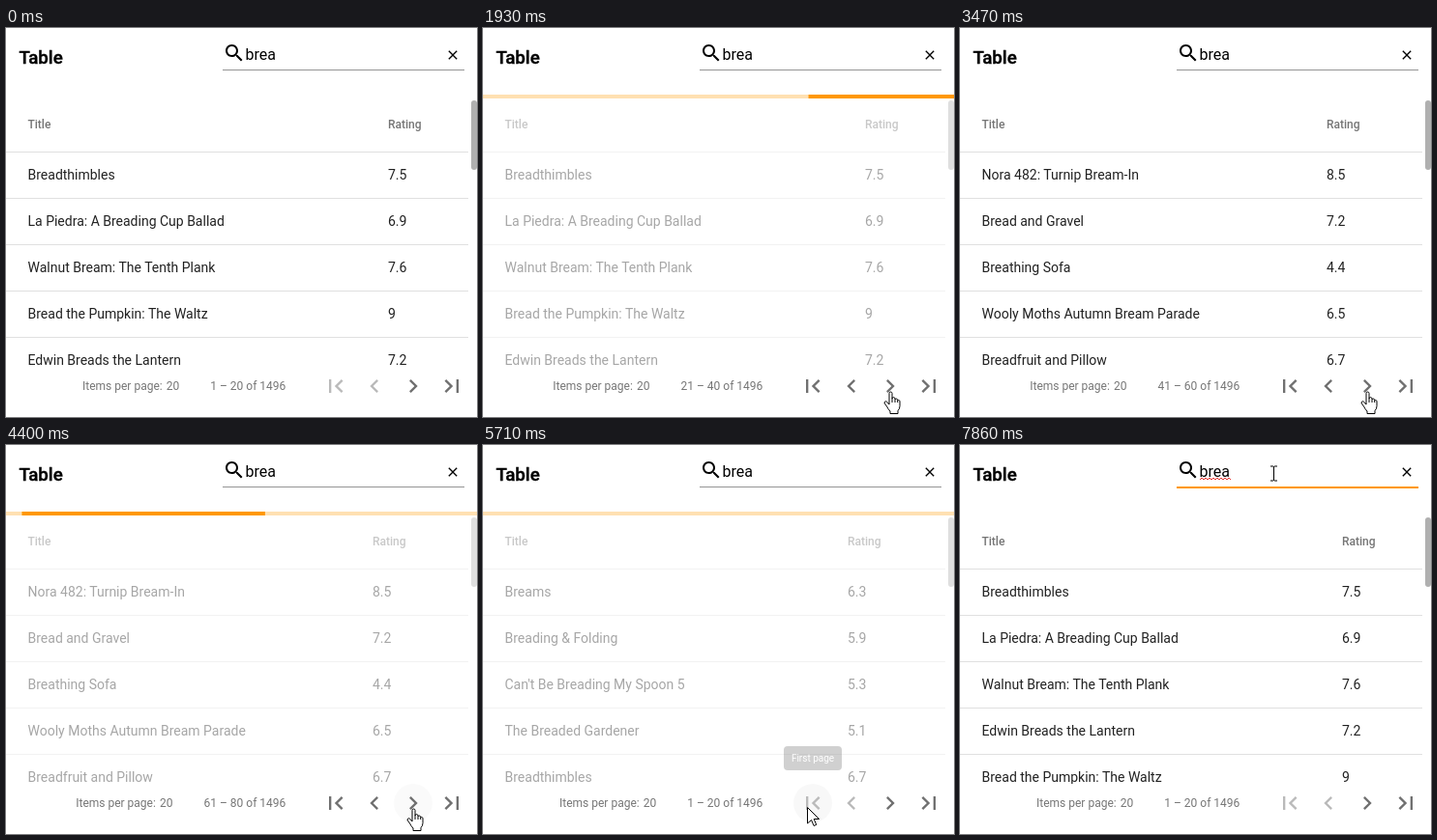
Recreate the animation shown at these times as an HTML page. Size 487 by 403 pixels, loop 8000 ms.

```html
<!DOCTYPE html>
<html lang="en">
<head>
<meta charset="utf-8">
<title>Table</title>
<style>
  html, body { margin: 0; width: 100%; height: 100%; overflow: hidden; background: #fff; }
  svg { display: block; width: 487px; height: 403px; font: 14px Roboto, sans-serif; fill: rgba(0,0,0,.87); }
  .heading { font-size: 18.72px; font-weight: 500; fill: #000; stroke: #000; stroke-width: .4; }
  .head { font-size: 12px; font-weight: 500; fill: rgba(0,0,0,.54); }
  .pager { font-size: 12px; fill: rgba(0,0,0,.54); }
  .end { text-anchor: end; }
  .cursor path { fill: #fff; stroke: #000; stroke-linejoin: round; }
</style>
</head>
<body>
<svg viewBox="0 0 487 403">
  <clipPath id="body"><rect y="73" width="487" height="278"/></clipPath>

  <text class="heading" x="13.4" y="37">Table</text>
  <g fill="#000">
    <path transform="translate(224 14)" d="M15.5 14h-.79l-.28-.27C15.41 12.59 16 11.11 16 9.5 16 5.91 13.09 3 9.5 3S3 5.91 3 9.5 5.91 16 9.5 16c1.61 0 3.09-.59 4.23-1.57l.27.28v.79l5 4.99L20.49 19l-4.99-5zm-6 0C7.01 14 5 11.99 5 9.5S7.01 5 9.5 5 14 7.01 14 9.5 11.99 14 9.5 14z"/>
    <path transform="translate(454 20) scale(.667)" d="M19 6.41L17.59 5 12 10.59 6.41 5 5 6.41 10.59 12 5 17.59 6.41 19 12 13.41 17.59 19 19 17.59 13.41 12z"/>
    <text x="247.5" y="33" font-size="16">brea</text>
  </g>
  <rect x="224" y="43" width="250" height="1" fill="#949494"/>
  <rect id="focusLine" y="43" height="2" fill="#ff9800"/>
  <path id="squiggle" fill="none" stroke="#e53935"/>
  <rect id="caret" x="279" y="19" width="1" height="18" fill="#000"/>

  <g id="bar">
    <rect y="69" width="487" height="4" fill="#ffe0b2"/>
    <rect id="primary" y="69" height="4" fill="#ff9800"/>
    <rect id="secondary" y="69" height="4" fill="#ff9800"/>
  </g>

  <g id="table" clip-path="url(#body)">
    <g id="rows"></g>
    <rect x="481" y="75" width="6" height="72" rx="3" fill="#b0b0b0"/>
  </g>

  <g class="pager">
    <g id="perPage"><text x="79" y="375">Items per page:</text><text x="179.3" y="375" class="end">20</text></g>
    <text id="range" x="289.3" y="375" class="end"></text>
  </g>
  <circle id="ripple" cy="371" r="20" fill="#000"/>
  <g id="buttons"></g>

  <g id="tooltip">
    <rect x="311" y="312" width="60" height="25" rx="4" fill="rgba(97,97,97,.9)"/>
    <text x="341" y="328" font-size="10" text-anchor="middle" fill="#fff">First page</text>
  </g>

  <g class="cursor" id="cursor">
    <g id="hand"><path transform="translate(-6 0)" d="M5.5 13.5V2a1.5 1.5 0 0 1 3 0v5.5a1.5 1.5 0 0 1 3 .2v.6a1.5 1.5 0 0 1 2.7.3v.7a1.4 1.4 0 0 1 2.3 1V15q0 3-2 5v3H6.5v-2.5q-2-2-3.5-5L.9 12.6a1.4 1.4 0 0 1 2.3-1.8zM8.5 7.5v4M11.5 8v3.5M14.2 9v2.5"/></g>
    <g id="arrow"><path d="M0 0V16.5L4 13l2.6 6 2.6-1.1L6.7 12H12Z"/></g>
    <g id="beam"><path style="fill:none" d="M-3.5-7.5h3L0-7l.5-.5h3M0-7V7M-3.5 7.5h3L0 7l.5.5h3"/></g>
  </g>
</svg>
<script>
const LOOP = 8000, WIDTH = 487;
const $ = id => document.getElementById(id);
const set = (id, attrs) => { for (const k in attrs) $(id).setAttribute(k, attrs[k]); };
const show = (id, on) => set(id, { display: on ? 'inline' : 'none' });
const clamp = v => Math.max(0, Math.min(1, v));

const first = [['Breadthimbles', 7.5], ['La Piedra: A Breading Cup Ballad', 6.9], ['Walnut Bream: The Tenth Plank', 7.6],
  ['Bread the Pumpkin: The Waltz', 9], ['Edwin Breads the Lantern', 7.2]];
const pages = [
  { x: 395, rows: first },
  { x: 416, rows: [['Breadelm', 4.2], ['No Tidy Lanterns: Painting the Other Window of Breading Elm', 8.4],
    ['Old Breams', 6.1], ['Bream Quilt', 5.9], ['Breading and Knitting', 6.2]] },
  { x: 379, rows: [['Nora 482: Turnip Bream-In', 8.5], ['Bread and Gravel', 7.2], ['Breathing Sofa', 4.4],
    ['Wooly Moths Autumn Bream Parade', 6.5], ['Breadfruit and Pillow', 6.7]] },
  { x: 377, rows: [['Breams', 6.3], ['Breading &amp; Folding', 5.9], ["Can't Be Breading My Spoon 5", 5.3],
    ['The Breaded Gardener', 5.1], ['Breadthimbles', 6.7]] },
  { x: 395, rows: [0, 1, 2, 4, 3].map(i => first[i]) }
];
const ranges = ['1 – 20', '21 – 40', '41 – 60', '61 – 80', '1 – 20'];

// Each request: button press, loading start, data arrival
const requests = [
  { press: 740, start: 830, end: 2160, x: 421 },
  { press: 2540, start: 2580, end: 3390, x: 421 },
  { press: 3850, start: 3940, end: 4710, x: 421 },
  { press: 5620, start: 5700, end: 6400, x: 341 }
];

const icons = [
  'M18.41 16.59L13.82 12l4.59-4.59L17 6l-6 6 6 6zM6 6h2v12H6z',
  'M15.41 7.41L14 6l-6 6 6 6 1.41-1.41L10.83 12z',
  'M10 6L8.59 7.41 13.17 12l-4.58 4.59L10 18l6-6z',
  'M5.59 7.41L10.18 12l-4.59 4.59L7 18l6-6-6-6zM16 6h2v12h-2z'
];
$('buttons').innerHTML = icons.map((d, i) =>
  `<path id="icon${i}" transform="translate(${327 + 40 * i} 357) scale(1.1667)" d="${d}"/>`).join('');
set('squiggle', { d: 'M248 36' + 'l2-2 2 2'.repeat(8) });

function bezier(x1, y1, x2, y2) {
  const at = (a, b, s) => 3 * (1 - s) ** 2 * s * a + 3 * (1 - s) * s * s * b + s ** 3;
  return x => {
    let lo = 0, hi = 1;
    for (let i = 0; i < 20; i++) {
      const mid = (lo + hi) / 2;
      if (at(x1, x2, mid) < x) lo = mid; else hi = mid;
    }
    return at(y1, y2, lo);
  };
}

// Keys are [position, value, easing towards the next key]
function sample(keys, p) {
  let i = 0;
  while (i < keys.length - 2 && p >= keys[i + 1][0]) i++;
  const [p0, v0, ease = v => v] = keys[i], [p1, v1] = keys[i + 1];
  return v0 + (v1 - v0) * ease(clamp((p - p0) / (p1 - p0)));
}

// Material indeterminate bar: centre and width in percent of the track
const segments = {
  primary: {
    centre: [[0, -95.17], [20, -95.17, bezier(.5, 0, .7017, .4958)],
      [59.15, -11.5, bezier(.3024, .3814, .55, .9564)], [100, 105.44]],
    width: [[0, 8], [36.65, 8, bezier(.3347, .1248, .7858, 1)], [69.15, 66.15, bezier(.06, .11, .6, 1)], [100, 8]]
  },
  secondary: {
    centre: [[0, -4.89, bezier(.15, 0, .5151, .4097)], [25, 32.76, bezier(.3103, .2841, .8, .7337)],
      [48.35, 79.5, bezier(.4, .627, .6, .902)], [100, 155.39]],
    width: [[0, 8, bezier(.205, .0571, .5766, .454)], [19.15, 45.71, bezier(.1523, .1964, .6484, 1.0043)],
      [44.15, 72.8, bezier(.2578, -.0032, .2118, 1.3818)], [100, 8]]
  }
};
const glide = v => v * v * (3 - 2 * v);
const cursorX = [[460, 440], [700, 420.5, glide], [4790, 420.5, glide], [5240, 335.5], [6440, 335.5], [6860, 303.5], [7170, 324.5]];
const cursorY = [[460, 400], [700, 376.5, glide], [4790, 376.5, glide], [5240, 375.5], [6440, 375.5], [6860, 147.5], [7170, 29.5]];
const focusEase = bezier(.25, .8, .25, 1);

let shownPage = -1;
function showPage(index) {
  if (index === shownPage) return;
  shownPage = index;
  const { x, rows } = pages[index];
  const line = y => `<rect y="${y}" width="478" height="1" fill="#e0e0e0"/>`;
  $('rows').innerHTML =
    `<g class="head"><text x="22.5" y="104">Title</text><text x="${x}" y="104">Rating</text></g>` + line(128) +
    rows.map(([title, rating], i) => {
      const y = 157 + 48 * i;
      return `<text x="22.5" y="${y}">${title}</text><text x="${x}" y="${y}">${rating}</text>` + line(y + 19);
    }).join('');
}

function drawTable(t) {
  const page = requests.filter(r => t >= r.end).length;
  const loading = requests.find(r => t >= r.start && t < r.end);
  showPage(page);
  const arrival = page ? requests[page - 1].end : -LOOP;
  set('table', { opacity: loading ? .4 : .7 + .3 * clamp((t - arrival) / 80) });
  show('bar', loading);
  if (!loading) return;
  const phase = (t - loading.start) / 20 % 100;
  for (const id in segments) {
    const centre = sample(segments[id].centre, phase), width = sample(segments[id].width, phase);
    set(id, { x: (centre - width / 2) / 100 * WIDTH, width: width / 100 * WIDTH });
  }
}

function drawPager(t) {
  const asked = requests.filter(r => t >= r.start).length;
  const onFirst = asked % 4 === 0;
  $('range').textContent = ranges[asked] + ' of 1496';
  set('perPage', { transform: `translate(${onFirst ? 0 : -6.8} 0)` });
  icons.forEach((_, i) => set('icon' + i, { fill: onFirst && i < 2 ? '#bababa' : '#707070' }));

  const pressed = requests.filter(r => t >= r.press).pop();
  const age = pressed ? t - pressed.press : LOOP;
  set('ripple', { cx: pressed ? pressed.x : 421, opacity: .06 * clamp(age / 200) * clamp((620 - age) / 200) });
  set('tooltip', { opacity: Math.min(clamp((t - 5250) / 150), clamp((5750 - t) / 120)) });
}

function drawSearch(t) {
  const focused = t >= 7320;
  const width = 250 * (.5 + .5 * focusEase(clamp((t - 7320) / 300)));
  set('focusLine', { x: 349 - width / 2, width, opacity: clamp((t - 7300) / 100) });
  show('squiggle', focused);
  show('caret', focused && t < 7860);
}

function drawCursor(t) {
  const x = sample(cursorX, t), y = sample(cursorY, t);
  const kind = y < 45 ? 'beam' : t < 5700 && y < 391 ? 'hand' : 'arrow';
  show('cursor', t >= 460);
  set('cursor', { transform: `translate(${x} ${y})` });
  for (const id of ['hand', 'arrow', 'beam']) show(id, id === kind);
}

function frame(now) {
  const t = now % LOOP;
  drawTable(t);
  drawPager(t);
  drawSearch(t);
  drawCursor(t);
  requestAnimationFrame(frame);
}
frame(0);
</script>
</body>
</html>
```
